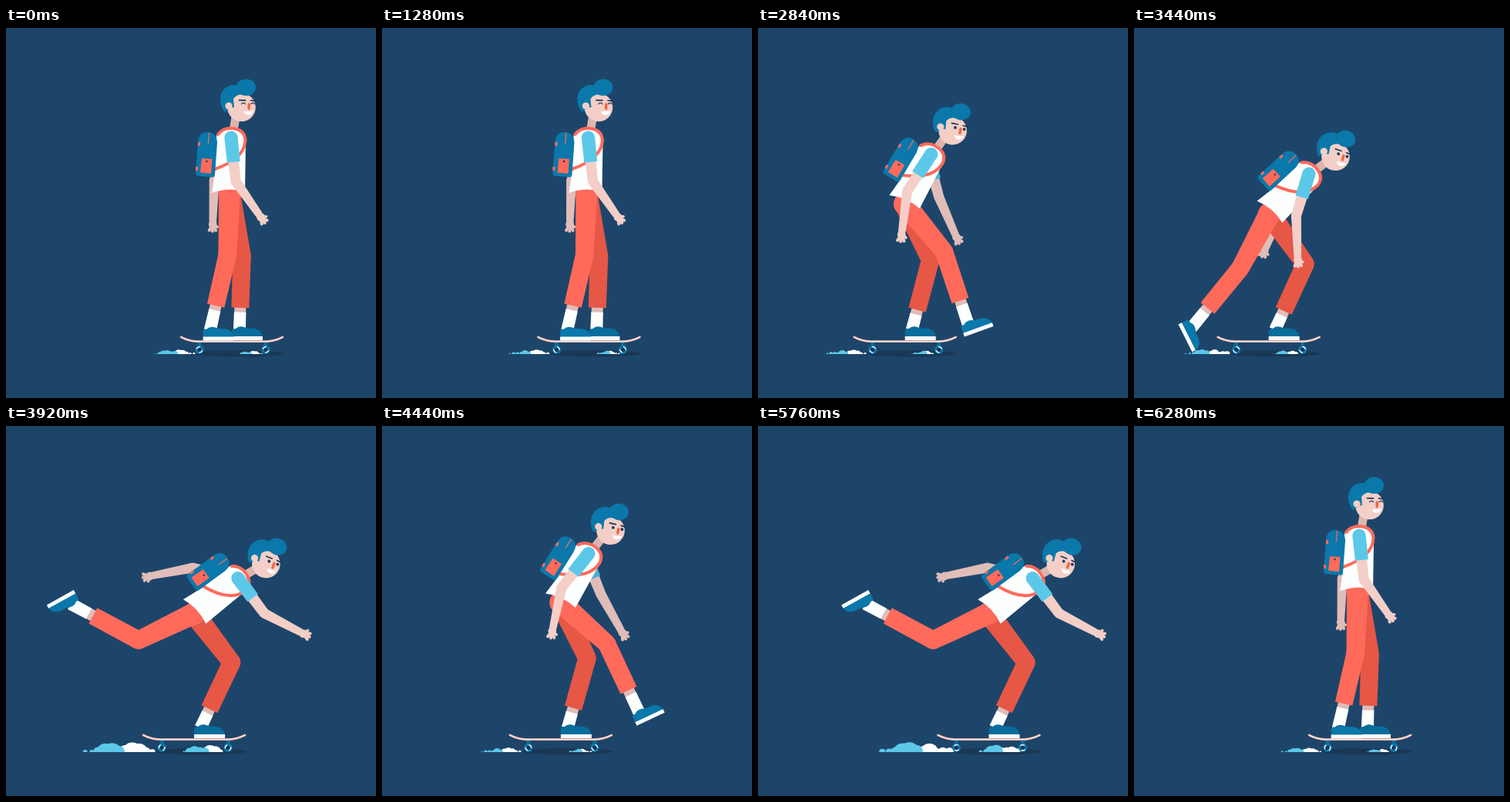
These frames come from a looping animation (480 by 480 pixels, 6.32 s). An HTML page with a canvas:

```html
<!DOCTYPE html>
<html lang="en">
<head>
<meta charset="utf-8">
<title>Skater</title>
<style>
  html, body { margin: 0; width: 100%; height: 100%; overflow: hidden; background: #1d456a; }
  canvas { display: block; width: 480px; height: 480px; }
</style>
</head>
<body>
<canvas id="stage"></canvas>
<script>
const LOOP = 6320, GROUND = 423;
const THIGH = 80, SHIN = 96, FAR_SHIN = 90, HEM = 67;
const HIP = [290, 215];            // hip in the coordinates of the torso drawing
const C = {
  bg: '#1d456a', shadow: '#1a3854', navy: '#1b3558',
  blue: '#0a78aa', shoeFar: '#086d9b', sky: '#5cc8e8', skyFar: '#48b0d2',
  skin: '#f3cfc8', skinFar: '#e0bdb8', neck: '#dcb5ad',
  coral: '#ff6a5b', coralFar: '#e65746', white: '#fdfefe', nose: '#f2663c'
};

const canvas = document.getElementById('stage');
const g = canvas.getContext('2d');
const dpr = window.devicePixelRatio || 1;
canvas.width = canvas.height = 480 * dpr;

// Angles in degrees: 0 hangs down, positive swings forward
const stand = { hipX: -3, hipY: 215, lean: 0, thigh: -2, shin: -13, foot: 0,
                arm: 6, hand: 35, farArm: -20, farHand: -2 };
const lift = { hipX: 0, hipY: 229, lean: 28, thigh: 48, shin: 25, foot: -25,
               arm: -38, hand: -12, farArm: 22, farHand: 29 };
const push = { hipX: 1, hipY: 241, lean: 43, thigh: -28, shin: -39, foot: 63,
               arm: -17, hand: 2, farArm: -33, farHand: -23 };
const back = { hipX: 0, hipY: 243, lean: 49, thigh: -61, shin: -111, foot: 143,
               arm: 32, hand: 57, farArm: -98, farHand: -74 };

// A blend beyond 1 overshoots b
const blend = (a, b, u) =>
  Object.fromEntries(Object.keys(a).map(k => [k, a[k] + (b[k] - a[k]) * u]));
const kick = blend(push, lift, 1.25), glide = blend(push, back, 1.1);

const key = (t, p) => ({ t, ...p });
const stride = (t, glideTime) => [
  key(t - 540, lift), key(t - 400, kick), key(t, push),
  key(t + 210, back), key(t + 400, glide), key(t + glideTime, glide)
];
const body = [
  key(0, stand), key(2500, stand),
  ...stride(3440, 540), ...stride(4980, 780),
  key(6240, stand), key(LOOP, stand)
];

const ride = [
  [0, 293], [1280, 268.5], [2120, 237.5], [3360, 171],
  [3960, 245], [4880, 220.5], [5540, 301], [LOOP, 293]
].map(([t, x]) => ({ t, x }));

// Monotone cubic interpolation of one field
function sample(keys, f, t) {
  let i = 0;
  while (i < keys.length - 2 && t >= keys[i + 1].t) i++;
  const slope = k => keys[k] && keys[k + 1]
    ? (keys[k + 1][f] - keys[k][f]) / (keys[k + 1].t - keys[k].t) : 0;
  const tangent = k => {
    const a = slope(k - 1), b = slope(k);
    return a * b > 0 ? 2 * a * b / (a + b) : 0;
  };
  const p = keys[i], q = keys[i + 1], h = q.t - p.t, u = (t - p.t) / h;
  const s = u * u * (3 - 2 * u), v = 1 - u;
  return p[f] * (1 - s) + q[f] * s + h * u * v * (v * tangent(i) - u * tangent(i + 1));
}

const rad = d => d * Math.PI / 180;
const swing = (p, l, deg) => [p[0] + l * Math.sin(rad(deg)), p[1] + l * Math.cos(rad(deg))];
const mix = (a, b, u) => [a[0] + (b[0] - a[0]) * u, a[1] + (b[1] - a[1]) * u];

function turn([x, y], deg) {
  const c = Math.cos(rad(deg)), s = Math.sin(rad(deg));
  return [x * c - y * s, x * s + y * c];
}

function oval(x, y, rx, ry, color) {
  g.fillStyle = color;
  g.beginPath();
  g.ellipse(x, y, rx, ry, 0, 0, 7);
  g.fill();
}
const disc = (p, r, color) => oval(p[0], p[1], r, r, color);

function line(a, b, w, color, cap = 'butt') {
  g.strokeStyle = color;
  g.lineWidth = w;
  g.lineCap = cap;
  g.beginPath();
  g.moveTo(...a);
  g.lineTo(...b);
  g.stroke();
}

// Tapered bar with flat ends
function bar(a, b, wa, wb, color) {
  const d = Math.hypot(b[0] - a[0], b[1] - a[1]);
  const nx = (a[1] - b[1]) / d / 2, ny = (b[0] - a[0]) / d / 2;
  g.fillStyle = color;
  g.beginPath();
  g.moveTo(a[0] + nx * wa, a[1] + ny * wa);
  g.lineTo(b[0] + nx * wb, b[1] + ny * wb);
  g.lineTo(b[0] - nx * wb, b[1] - ny * wb);
  g.lineTo(a[0] - nx * wa, a[1] - ny * wa);
  g.fill();
}

const fill = (d, color) => { g.fillStyle = color; g.fill(new Path2D(d)); };
function stroke(d, w, color) {
  g.strokeStyle = color;
  g.lineWidth = w;
  g.lineCap = 'round';
  g.stroke(new Path2D(d));
}

// Draws with p as the origin, turned by deg
function at(p, deg, draw) {
  g.save();
  g.translate(...p);
  g.rotate(rad(deg));
  draw();
  g.restore();
}

function arm(shoulder, upper, a, b, skin, sleeve) {
  const elbow = swing(shoulder, upper, a);
  const wrist = swing(elbow, 54, b), palm = swing(elbow, 57, b);
  bar(shoulder, elbow, 15, 13, skin);
  disc(elbow, 6.5, skin);
  bar(elbow, wrist, 13, 9.5, skin);
  disc(palm, 5.4, skin);
  for (const f of [-28, 0, 28]) line(palm, swing(palm, 9, b + f), 4, skin, 'round');
  line(palm, swing(palm, 7, b + 62), 3.6, skin, 'round');
  disc(shoulder, 8.6, sleeve);
  bar(shoulder, swing(shoulder, 32, a), 17.2, 17, sleeve);
}

function leg(hip, knee, ankle, footDeg, pants, shoe) {
  const length = Math.hypot(ankle[0] - knee[0], ankle[1] - knee[1]);
  const along = d => mix(knee, ankle, d / length);
  bar(along(HEM - 3), along(HEM + 8), 15, 15, C.skinFar);
  bar(along(HEM + 6), along(length + 4), 15.5, 16, C.white);
  at(ankle, footDeg, () => {
    fill('M-10 12.5V4Q-9 2 -5 2Q-1 -2 6 0Q9 2 13 1.5Q28 1 30 12.5Z', shoe);
    fill('M-10 12H30V17H-10Z', C.white);
  });
  disc(hip, 14.5, pants);
  bar(hip, knee, 28, 23.5, pants);
  disc(knee, 11.7, pants);
  bar(knee, along(HEM), 23.5, 23, pants);
}

// Knee of the standing leg: bent forward and never quite straight
function bend(hip, ankle) {
  const dx = ankle[0] - hip[0], dy = ankle[1] - hip[1], d = Math.hypot(dx, dy);
  const a = (THIGH ** 2 - FAR_SHIN ** 2 + d * d) / (2 * d);
  const h = Math.sqrt(Math.max(100, THIGH ** 2 - a * a));
  return [hip[0] + (dx * a + dy * h) / d, hip[1] + (dy * a - dx * h) / d];
}

function dust(x, length, size, t, count) {
  g.save();
  g.beginPath();
  g.rect(0, 380, 480, GROUND - 380);
  g.clip();
  for (let i = 0; i < count; i++) {
    const p = (t / 790 + i / count) % 1;
    const puff = 0.4 + 0.6 * Math.abs(Math.sin(i * 2.4 + 1));
    const r = size * puff * Math.sin(Math.PI * (0.12 + 0.83 * p));
    oval(x - p * length, GROUND - r * 0.2, r * 1.15, r, p < 0.45 ? C.white : C.sky);
  }
  g.restore();
}

function board(x, t) {
  at([x, 0], 0, () => {
    for (const wx of [-42, 44]) {
      line([wx, 407], [wx, 413], 5, C.shoeFar);
      disc([wx, 417.3], 5.6, C.blue);
      disc([wx, 417.3], 2.6, C.navy);
      at([wx, 417.3], t * 360 / 395, () => {
        stroke('M-3.6 -1.2Q-2.6 -3.4 0 -3.8M3.6 1.2Q2.6 3.4 0 3.8', 1.4, C.white);
      });
    }
    const deck = new Path2D('M-66 401Q-55 406.6 -44 406.6H44Q55 406.6 66 401');
    g.lineCap = 'round';
    for (const [w, color] of [[2.8, '#e9a098'], [1.6, '#fbe3de']]) {
      g.lineWidth = w;
      g.strokeStyle = color;
      g.stroke(deck);
    }
  });
}

function torso() {
  bar([295, 133], [299, 110], 11, 11, C.neck);
  fill('M273 140Q278 129 292 129Q310 130 311 148L310 212Q288 206 267 214L271 188Z', C.white);
  stroke('M275 138Q281 130 292 130Q310 131 310.5 146Q309 170 271 183', 4, C.coral);
  fill('M246 188L249 148Q250 135 262 135Q274 136 274 149L271 190Q271 194 267 193.5L250 192Q246 192 246 188Z', C.blue);
  fill('M254 169L267.5 170L266 189L252 187.5Z', C.coral);
  disc([260.5, 173], 1.2, C.navy);
  line([263.5, 136], [262.3, 150], 1.2, C.coral);
  fill('M249 148h3v5h-3ZM246 180h3v5h-3Z', C.coral);
}

function head(happy) {
  g.translate(-302, -110);
  disc([296, 92], 18, C.blue);
  oval(305.5, 103, 18.3, 18.3, C.skin);
  fill('M284 109Q277 101 278 90Q281 74 298 74L312 87Q300 84 295 92L296 103H292L284 109Z', C.blue);
  oval(311.5, 77, 12.5, 10.8, C.blue);
  disc([289, 101], 4.6, C.skin);
  stroke('M302.5 93.6L310.5 93.8M317.5 94L323 94.6', 1.7, C.navy);
  if (happy) stroke('M305.5 98.6Q308 95.6 310.5 98.6M318 98.6Q320 95.8 322.3 98.6', 1.3, C.navy);
  else for (const ex of [308, 319.8]) disc([ex, 98.5], 1.9, C.navy);
  stroke('M315.2 99V104.5', 3.4, C.nose);
  fill('M308.5 108Q315 109 320.5 107Q319.5 113 314.5 113Q310 112.5 308.5 108Z', C.white);
}

function draw(t) {
  const x = sample(ride, 'x', t);
  const p = {};
  for (const f in stand) p[f] = sample(body, f, t);
  const hip = [x + p.hipX, p.hipY];
  const onTorso = (px, py) => {
    const d = turn([px - HIP[0], py - HIP[1]], p.lean);
    return [hip[0] + d[0], hip[1] + d[1]];
  };

  g.setTransform(dpr, 0, 0, dpr, 0, 0);
  g.fillStyle = C.bg;
  g.fillRect(0, 0, 480, 480);
  oval(x + 8, 422.3, 60, 4.3, C.shadow);

  // The dust grows as the leg flies back
  const effort = Math.min(1, Math.max(0, -p.shin / 111)) ** 2;
  const length = 54 + 42 * effort, size = 5 + 6.5 * effort;
  dust(x - 49, length, size, t, 11);
  dust(x + 39, length * 0.56, size * 0.75, t + 300, 8);

  arm(onTorso(289, 146), 55, p.farArm, p.farHand, C.skinFar, C.skyFar);
  board(x, t);

  const farAnkle = [x + 10, 388];
  leg(hip, bend(hip, farAnkle), farAnkle, 0, C.coralFar, C.shoeFar);
  const knee = swing(hip, THIGH, p.thigh);
  leg(hip, knee, swing(knee, SHIN, p.shin), p.foot, C.coral, C.blue);

  at(hip, p.lean, () => {
    g.translate(-HIP[0], -HIP[1]);
    torso();
  });
  at(onTorso(302, 110), p.lean * 0.4, () => head(p.lean < 10));
  arm(onTorso(292, 142), 57, p.arm, p.hand, C.skin, C.sky);
}

const start = performance.now();
function frame() {
  draw((performance.now() - start) % LOOP);
  requestAnimationFrame(frame);
}
frame();
</script>
</body>
</html>
```
